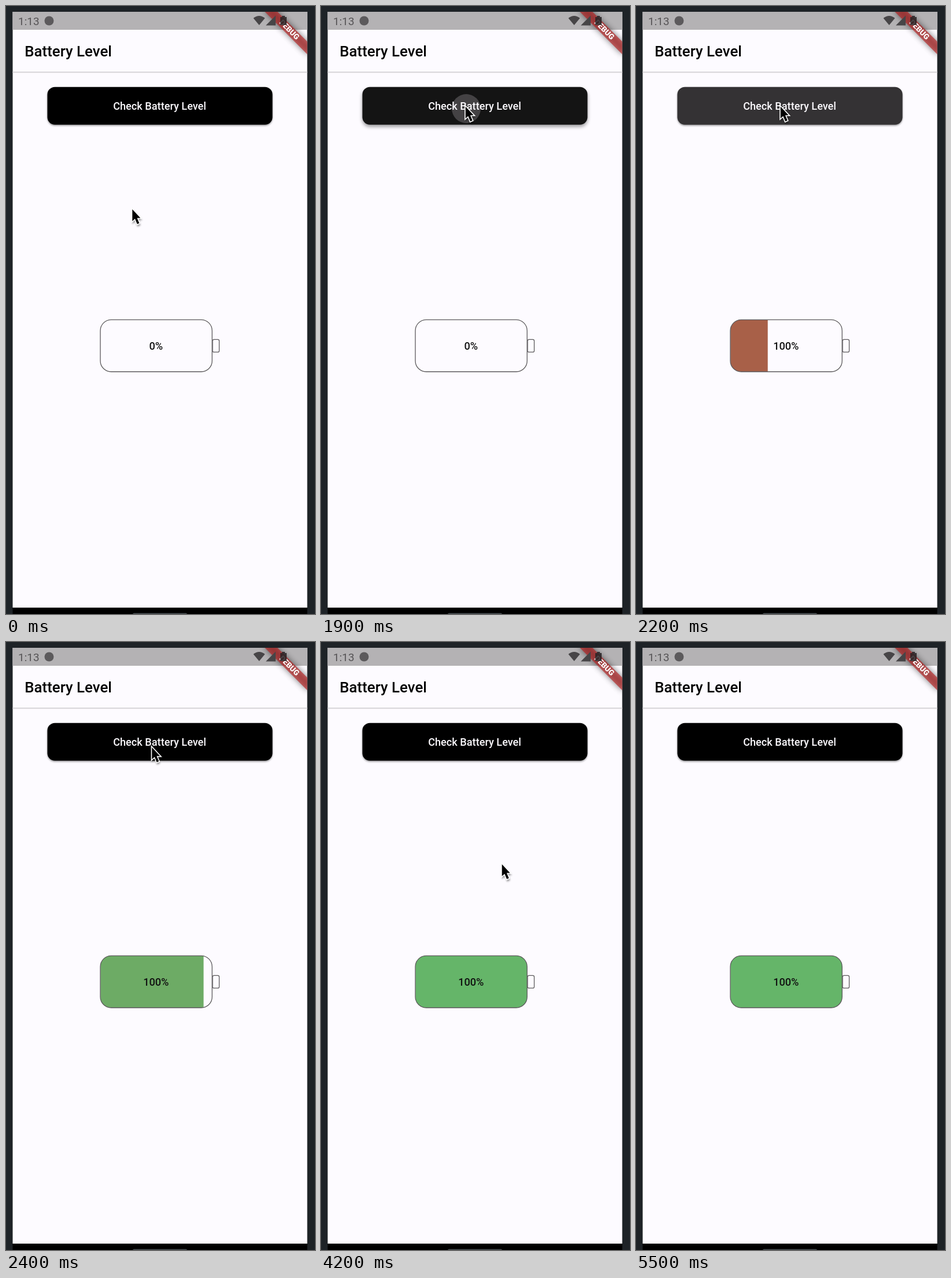
An HTML page for the animation above (6.2 s loop, 534 by 1049 pixels).

```html
<!DOCTYPE html>
<html lang="en">
<head>
<meta charset="utf-8">
<title>Battery Level</title>
<style>
  html, body { margin: 0; width: 100%; height: 100%; overflow: hidden; background: #1e2327; }
  svg { display: block; width: 534px; height: 1049px; font-family: Roboto, sans-serif; font-weight: 500; }
</style>
</head>
<body>
<svg viewBox="0 0 534 1049">
  <defs>
    <clipPath id="screen"><path d="M11.5 10H520.6V1038H11.5Z"/></clipPath>
    <clipPath id="buttonClip"><rect x="71.5" y="139.8" width="389" height="65" rx="13"/></clipPath>
    <clipPath id="batteryClip"><rect x="163" y="541.4" width="193.2" height="89.6" rx="18.8"/></clipPath>
    <filter id="soft" x="-20%" y="-100%" width="140%" height="300%"><feGaussianBlur stdDeviation="5.1"/></filter>
    <filter id="near" x="-20%" y="-50%" width="140%" height="200%"><feGaussianBlur id="blur" stdDeviation="1.6"/></filter>
    <filter id="arrowBlur" x="-50%" y="-50%" width="200%" height="200%"><feGaussianBlur stdDeviation="1.6"/></filter>
    <path id="arrow" d="M0 0V20.5L4.6 16.4L8.4 25.6L12 24L8.2 15H14Z"/>
  </defs>

  <path d="M11.5 10H520.6V1049H11.5Z"/>
  <rect x="219" y="1047.5" width="94" height="4" rx="2" fill="#4a5154"/>

  <g clip-path="url(#screen)">
    <path d="M11 10H521V1038H11Z" fill="#fdfbff"/>
    <path d="M11 10H521V41H11Z" fill="#b4b2b4"/>
    <path d="M11 113.3H521V115.3H11Z" fill="#d6d4d7"/>
    <text x="32.2" y="87" font-size="25.9">Battery Level</text>

    <rect id="shadow" x="71.5" y="139.8" width="389" height="65" rx="13" opacity=".4" filter="url(#near)"/>
    <g clip-path="url(#buttonClip)" fill="#fef6ff">
      <path d="M71 139H462V206H71Z" fill="#000"/>
      <path id="tint" d="M71 139H462V206H71Z"/>
      <circle id="ripple" cx="251" cy="177"/>
    </g>
    <text x="265.6" y="179.3" font-size="18.15" fill="#fdfbff" text-anchor="middle">Check Battery Level</text>

    <rect id="charge" x="163.3" y="541" height="91" clip-path="url(#batteryClip)"/>
    <g fill="none" stroke="#5c5a5c" stroke-width="1.3">
      <rect x="163" y="541.4" width="193.2" height="89.6" rx="18.8"/>
      <rect x="357" y="575.4" width="11.5" height="21.8" rx="2.5"/>
    </g>
    <text id="percent" x="259.3" y="592.8" font-size="18.15" fill="#111" text-anchor="middle"></text>

    <g transform="translate(520.6 10) rotate(45)">
      <rect x="-52" y="36.3" width="104" height="15.5" opacity=".5" filter="url(#soft)"/>
      <rect x="-52" y="36.3" width="104" height="15.5" fill="#b71c1c" fill-opacity=".627"/>
      <text y="48" font-size="13.2" font-weight="900" fill="#fff" text-anchor="middle">DEBUG</text>
    </g>

    <g fill="#474547">
      <text x="21" y="33" font-size="19" font-weight="400" fill="#555355">1:13</text>
      <circle cx="74.5" cy="25.5" r="8" fill="#5c5a5c"/>
      <path d="M437.5 33L427.5 21Q437.5 13 447.5 21Z"/>
      <path d="M449 33.5L466 16.5V33.5Z"/>
      <path d="M477 17h5v2h3v14h-11v-14h3z" fill="#272325" opacity=".85"/>
    </g>
  </g>

  <g id="cursor">
    <use href="#arrow" x="1" y="3" opacity=".4" stroke="#000" stroke-width="2" filter="url(#arrowBlur)"/>
    <use href="#arrow" stroke="#fff" stroke-width="3.2" paint-order="stroke"/>
  </g>
</svg>
<script>
const LOOP = 6200, STEP = 100;
const PRESS = 1900, RELEASE = 2200, CURSOR_GONE = 5500;
const el = id => document.getElementById(id);
const set = (id, attrs) => { for (const k in attrs) el(id).setAttribute(k, attrs[k]); };
const mix = (a, b, k) => a + (b - a) * k;
const progress = (t, from, to) => Math.min(1, Math.max(0, (t - from) / (to - from)));
const smooth = k => k * k * (3 - 2 * k);

const glides = [
  { from: 0, to: 700, x: 249.7, y: 173.5 },
  { from: 2250, to: 3500, x: 312.7, y: 383.5 },
  { from: 4200, to: 4600, x: 328, y: 376 },
  { from: 5100, to: CURSOR_GONE, x: 440, y: 220 }
];

// cubic-bezier(.42, 0, .58, 1), solved by bisection
function easeInOut(x) {
  let lo = 0, hi = 1;
  for (let i = 0; i < 20; i++) {
    const s = (lo + hi) / 2, r = 1 - s;
    if (3 * r * s * (.42 * r + .58 * s) + s ** 3 < x) lo = s; else hi = s;
  }
  return smooth(lo);
}

function drawCursor(t) {
  let x = 218.3, y = 350.7;
  for (const g of glides) {
    const k = smooth(progress(t, g.from, g.to));
    x = mix(x, g.x, k);
    y = mix(y, g.y, k);
  }
  set('cursor', { transform: `translate(${x} ${y})`, visibility: t < CURSOR_GONE ? 'visible' : 'hidden' });
}

function drawButton(t) {
  const lift = Math.sin(Math.PI * progress(t, PRESS - STEP, RELEASE));
  const age = Math.max(0, t - PRESS) / 100;
  const glow = t < PRESS ? 0 : .205 * (1 - progress(t, RELEASE, RELEASE + 200));
  set('tint', { opacity: .11 * lift });
  set('ripple', { opacity: glow, r: 25 + 30 * age + 18 * age * age });
  set('shadow', { transform: `translate(0 ${1.7 + 2.5 * lift})` });
  set('blur', { stdDeviation: 1.6 + 2 * lift });
}

function drawBattery(t) {
  const level = easeInOut(progress(t, 2000, 2500));
  const color = [[201, 101], [54, 181], [55, 105]].map(([a, b]) => Math.round(mix(a, b, level)));
  set('charge', { width: 194 * level, fill: `rgb(${color})` });
  el('percent').textContent = t > 2000 ? '100%' : '0%';
}

const start = performance.now();
function frame() {
  const now = (performance.now() - start) % LOOP;
  const t = Math.floor(now / STEP) * STEP;
  drawCursor(t);
  drawButton(t);
  drawBattery(t);
  requestAnimationFrame(frame);
}
frame();
</script>
</body>
</html>
```
